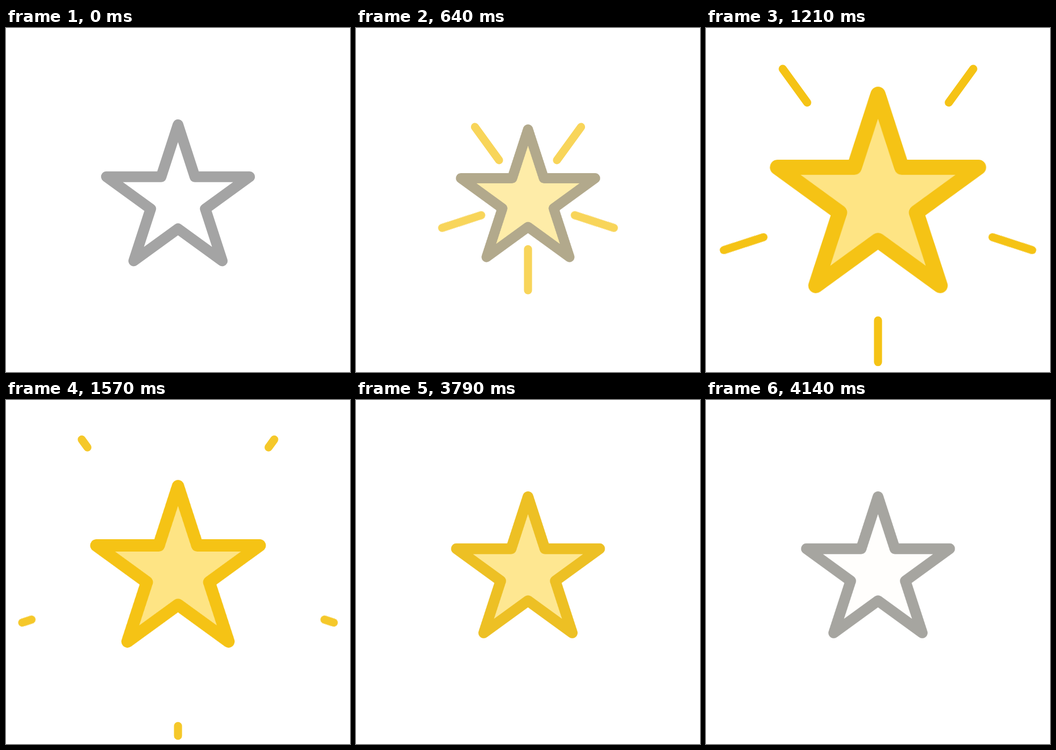
Recreate the animation shown at these times as an HTML page without scripts. Size 640 by 640 pixels, loop 4.78 s.

```html
<!DOCTYPE html>
<html lang="en">
<head>
<meta charset="utf-8">
<title>Star burst</title>
<style>
  @property --head { syntax: "<length>"; inherits: true; initial-value: 80px; }
  @property --tail { syntax: "<length>"; inherits: true; initial-value: 80px; }

  html, body { margin: 0; width: 100%; height: 100%; overflow: hidden; background: #fff; }
  svg { display: block; width: 100%; height: 100%; }

  .star {
    stroke-width: 20;
    stroke-linejoin: round;
    animation: pop 4780ms infinite, outline 4780ms linear infinite, glow 4780ms linear infinite;
  }
  .rays {
    stroke: #f5c315;
    stroke-width: 15;
    stroke-linecap: round;
    stroke-dasharray: calc(var(--head) - var(--tail)) 999px;
    stroke-dashoffset: calc(-1 * var(--tail));
    animation: head 4780ms linear infinite, tail 4780ms linear infinite, flash 4780ms linear infinite;
  }

  @keyframes pop {
    0% { transform: scale(1); animation-timing-function: ease-in-out; }
    10.46% { transform: scale(.8); animation-timing-function: cubic-bezier(.5, 0, .5, 1); }
    19.456% { transform: scale(1.5); animation-timing-function: cubic-bezier(.33, 0, .4, 1); }
    44.77%, 100% { transform: scale(1); }
  }
  @keyframes outline {
    0%, 12.552% { stroke: #a4a4a4; }
    17.573%, 78.452% { stroke: #f5c315; }
    86.611%, 100% { stroke: #a6a5a0; }
  }
  @keyframes glow {
    0%, 10.46% { fill: #fff; }
    14.644%, 78.452% { fill: #fee484; }
    86.611%, 100% { fill: #fffefc; }
  }

  /* Rays: the outer end shoots out, the inner end follows more slowly. */
  @keyframes head {
    0%, 8.368% { --head: 80px; }
    11.925% { --head: 140.5px; }
    13.389% { --head: 167.5px; animation-timing-function: cubic-bezier(.333, .354, .667, .921); }
    19.456% { --head: 290.5px; animation-timing-function: cubic-bezier(.333, .714, .667, .857); }
    23.849% { --head: 300.3px; animation-timing-function: cubic-bezier(.333, .65, .667, 1); }
    32.845% { --head: 304.7px; }
    37.448%, 100% { --head: 305.3px; }
  }
  @keyframes tail {
    0% { --tail: 80px; }
    8.368% { --tail: 80px; animation-timing-function: cubic-bezier(.333, 0, .667, .165); }
    13.389% { --tail: 91.5px; animation-timing-function: cubic-bezier(.333, .184, .667, .586); }
    19.456% { --tail: 154.5px; animation-timing-function: cubic-bezier(.333, .436, .667, .806); }
    32.845% { --tail: 286.5px; animation-timing-function: cubic-bezier(.333, .476, .667, 1); }
    37.448%, 100% { --tail: 305px; }
  }
  @keyframes flash {
    0%, 10.46% { opacity: 0; }
    14.644%, 32.427% { opacity: 1; }
    37.448%, 100% { opacity: 0; }
  }
</style>
</head>
<body>
<svg viewBox="-320 -320 640 640">
  <defs><path id="ray" d="M0 0V400"/></defs>
  <g class="rays">
    <use href="#ray"/>
    <use href="#ray" transform="rotate(72)"/>
    <use href="#ray" transform="rotate(144)"/>
    <use href="#ray" transform="rotate(216)"/>
    <use href="#ray" transform="rotate(288)"/>
  </g>
  <polygon class="star" points="0,-140 31.43,-43.26 133.15,-43.26 50.86,16.53 82.29,113.26 0,53.48 -82.29,113.26 -50.86,16.53 -133.15,-43.26 -31.43,-43.26"/>
</svg>
</body>
</html>
```
